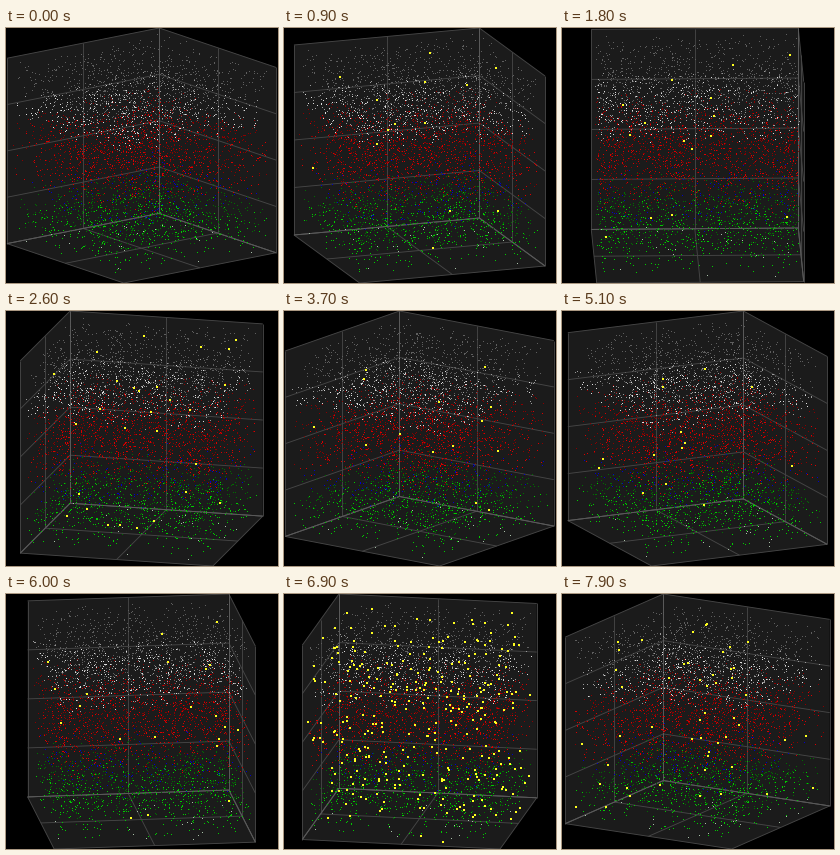
Write a matplotlib script that moves like this. It is 272 by 255 pixels and loops after 8000 ms.

```python
import numpy as np
import matplotlib.pyplot as plt
from matplotlib.animation import FuncAnimation
from matplotlib.collections import LineCollection, PolyCollection

W, H, DPI = 272, 255, 64
FRAMES, STEP_MS = 80, 100
PX = 72 / DPI
ELEV = np.radians(15)
START, TURN = 37.5, 2.0

# colour, count, lowest and highest z of each layer
LAYERS = [
    ("#5e5e5e", 850, 0.77, 0.985),
    ("#9a9a9a", 380, 0.67, 0.81),
    ("#dedede", 220, 0.67, 0.78),
    ("#8a0000", 1000, 0.38, 0.71),
    ("#d80000", 600, 0.33, 0.62),
    ("#0000c8", 140, 0.23, 0.36),
    ("#006e00", 620, 0.10, 0.29),
    ("#00cc00", 450, 0.02, 0.20),
    ("#a8c0a8", 24, 0.00, 0.03),
]

rng = np.random.default_rng(7)


def make_layer(count, low, high):
    xy = rng.uniform(-0.485, 0.485, (count, 2))
    z = rng.uniform(low, high, count) - 0.5
    return np.column_stack([xy, z])


clouds = [make_layer(n, lo, hi) for _, n, lo, hi in LAYERS]
cells = np.vstack(clouds)


def project(points, angle):
    """Orthographic view, scaled so the cube fills the stage height."""
    u, v, z = np.moveaxis(np.asarray(points, float), -1, 0)
    c, s = np.cos(angle), np.sin(angle)
    scale = H / (np.cos(ELEV) + (abs(c) + abs(s)) * np.sin(ELEV))
    x = (W - 1) / 2 + scale * (u * c - v * s)
    depth = u * s + v * c
    y = H / 2 - scale * (z * np.cos(ELEV) + depth * np.sin(ELEV))
    return np.stack([x, y], axis=-1)


def box(angle):
    """Panes, grid lines and inner edges of the three far faces."""
    a = 0.5 if np.sin(angle) > 0 else -0.5
    b = 0.5 if np.cos(angle) > 0 else -0.5
    h = 0.5
    panes = [
        [(-h, b, -h), (h, b, -h), (h, b, h), (-h, b, h)],
        [(a, -h, -h), (a, h, -h), (a, h, h), (a, -h, h)],
        [(-h, -h, -h), (h, -h, -h), (h, h, -h), (-h, h, -h)],
    ]
    grid = []
    for t in (-h, 0, h):
        grid += [
            [(t, b, -h), (t, b, h)], [(a, t, -h), (a, t, h)],
            [(t, -h, -h), (t, h, -h)], [(-h, t, -h), (h, t, -h)],
        ]
    for z in np.linspace(-h, h, 5):
        grid += [[(-h, b, z), (h, b, z)], [(a, -h, z), (a, h, z)]]
    edges = [
        [(a, b, -h), (a, b, h)],
        [(-h, b, -h), (h, b, -h)],
        [(a, -h, -h), (a, h, -h)],
    ]
    return panes, grid, edges


def firing(i):
    """Cells that flash at step i, with one strong burst near the end."""
    keys = [0, 1, 9, 20, 26, 37, 51, 63, 69, 73, 79]
    rates = [0, 8, 14, 16, 28, 14, 14, 24, 310, 180, 50]
    count = int(np.interp(i, keys, rates))
    return np.random.default_rng(100 + i).choice(len(cells), count, replace=False)


fig = plt.figure(figsize=(W / DPI, H / DPI), dpi=DPI, facecolor="black")
ax = fig.add_axes([0, 0, 1, 1])
ax.set_xlim(0, W)
ax.set_ylim(H, 0)
ax.axis("off")

walls = ax.add_collection(PolyCollection([], facecolors="#1b1b1b", edgecolors="none", zorder=1))
grid_lines = ax.add_collection(LineCollection([], colors="#464646", linewidths=0.9 * PX, zorder=2))
edge_lines = ax.add_collection(LineCollection([], colors="#5c5c5c", linewidths=0.9 * PX, zorder=3))
dots = [ax.plot([], [], ",", color=layer[0], zorder=4)[0] for layer in LAYERS]
flashes, = ax.plot([], [], "s", color="#ffff20", ms=2 * PX, mew=0, zorder=5)


def draw(i):
    angle = np.radians(START - TURN * i)
    for artist, shapes in zip((walls, grid_lines, edge_lines), box(angle)):
        artist.set_verts(list(project(shapes, angle)))
    for line, cloud in zip(dots, clouds):
        line.set_data(*project(cloud, angle).T)
    flashes.set_data(*project(cells[firing(i)], angle).T)
    return [walls, grid_lines, edge_lines, *dots, flashes]


anim = FuncAnimation(fig, draw, frames=FRAMES, interval=STEP_MS, repeat=True, repeat_delay=0)
plt.show()
```
